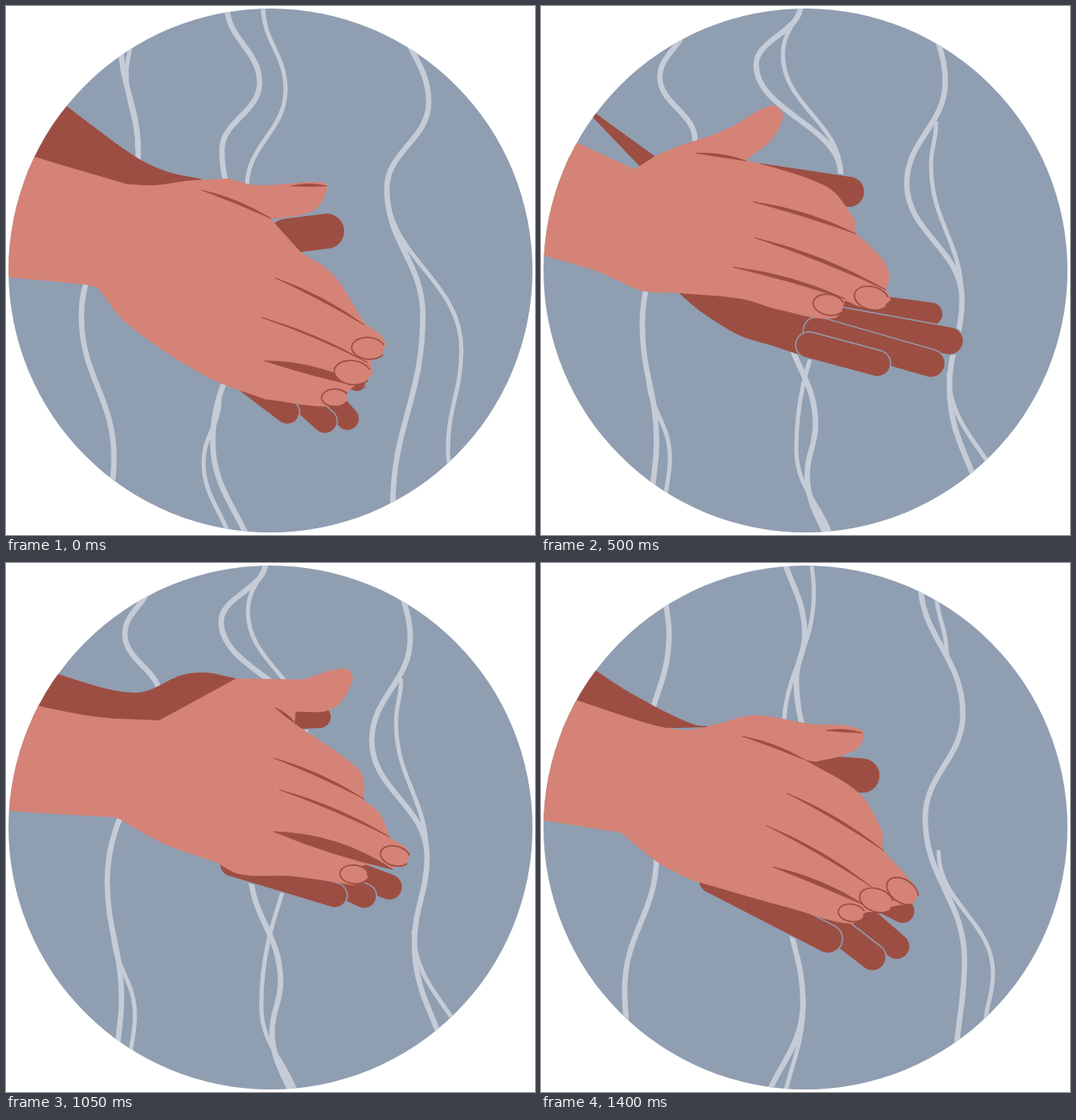
Recreate the animation shown at these times as an HTML page with a canvas. Size 632x632 px, loop 1600 ms.

```html
<!DOCTYPE html>
<html lang="en">
<head>
<meta charset="utf-8">
<title>Washing hands</title>
<style>
html, body { margin: 0; width: 100%; height: 100%; overflow: hidden; background: #fff; }
canvas { display: block; }
</style>
</head>
<body>
<canvas id="stage" width="632" height="632"></canvas>
<script>
const ctx = document.getElementById('stage').getContext('2d');
const BLUE = '#909eb1', WATER = '#c5ccd7', SKIN = '#d48376', DARK = '#9d4e43';
const rad = deg => deg * Math.PI / 180;
const points = text => text.trim().split(' ').map(s => s.split(',').map(Number));

// Smooth outline through key points; a slash marks a corner.
function outline(text) {
  const path = new Path2D();
  let last = null;
  for (const part of text.split('/')) {
    const p = points(part);
    if (last) p.unshift(last);
    else path.moveTo(...p[0]);
    const heading = i => {
      const [x0, y0] = p[Math.max(i - 1, 0)], [x1, y1] = p[Math.min(i + 1, p.length - 1)];
      return Math.atan2(y1 - y0, x1 - x0);
    };
    for (let i = 1; i < p.length; i++) {
      const [x0, y0] = p[i - 1], [x1, y1] = p[i];
      const reach = Math.hypot(x1 - x0, y1 - y0) / 3, a = heading(i - 1), b = heading(i);
      path.bezierCurveTo(x0 + reach * Math.cos(a), y0 + reach * Math.sin(a),
        x1 - reach * Math.cos(b), y1 - reach * Math.sin(b), x1, y1);
    }
    last = p[p.length - 1];
  }
  return path;
}

// Water swings from one turning point to the next, upright at each.
function stream(text) {
  const path = new Path2D(), p = points(text);
  path.moveTo(...p[0]);
  for (let i = 1; i < p.length; i++) {
    const [x0, y0] = p[i - 1], [x1, y1] = p[i], k = (y1 - y0) * 0.43;
    path.bezierCurveTo(x0, y0 + k, x1, y1 - k, x1, y1);
  }
  return path;
}

// Turning points of the wide and the narrow streams.
const water = [
  {
    wide: ['137,40 158,175 90,370 129,540 125,600', '264,0 303,92 258,172 295,330 247,520 300,690',
      '470,0 505,115 455,218 498,370 462,600'],
    thin: ['149,40 144,80 157,170', '307,0 334,100 288,215', '255,470 236,545 270,660',
      '455,218 544,410 528,530 530,560']
  }, {
    wide: ['148,30 153,85 123,235 138,350 100,510 102,560',
      '285,-40 315,85 305,140 325,270 295,400 313,525 262,680',
      '453,20 504,180 459,305 506,475 495,610'],
    thin: ['323,-10 326,35 290,200 317,320', '314,520 285,690', '472,30 485,112',
      '475,345 540,490 530,560']
  }, {
    wide: ['172,20 142,85 184,160 121,380 138,520 132,600', '310,0 257,70 358,200',
      '292,365 328,500 318,560 352,680', '470,10 483,90 437,212 503,350 488,455 530,630'],
    thin: ['128,440 154,540 148,600', '315,-20 289,58 358,200 358,250 305,530 350,660',
      '472,140 466,190 503,350', '487,440 560,620']
  }
];

// far: arm or palm behind, fingers: from, to, width,
// front: near hand, folds: from, to, thickness, nails: x, y, length, degrees.
const hands = {
  clasp: {
    far: '40,95 / 73,120 150,177 190,197 235,207 / 145,230 0,200',
    fingers: [[335, 275, 383, 269, 42], [385, 442, 420, 451, 18], [370, 450, 408, 493, 27],
      [335, 455, 381, 496, 28], [290, 450, 336, 485, 28]],
    front: '0,168 / 34,180 145,213 / 180,214 215,209 265,206 / 300,214 378,210 384,217 368,244 317,255 / 352,294 / 390,320 428,378 / 453,403 436,425 / 437,440 424,449 / 409,460 395,478 310,470 / 240,443 145,380 110,337 / 95,333 0,324',
    folds: [[322, 325, 428, 381, 3], [305, 372, 432, 426, 2], [309, 424, 430, 456, 10],
      [234, 220, 317, 254, 3], [341, 215, 383, 215, 3]],
    nails: [[433, 409, 20, 5], [414, 438, 22, 8], [393, 468, 16, 0]]
  },
  slide: {
    far: '40,110 / 65,128 110,157 180,192 210,196 / 20,200',
    fingers: [[330, 250, 384, 254, 41], [400, 400, 432, 416, 28], [370, 410, 425, 458, 30],
      [330, 420, 396, 471, 31], [205, 378, 343, 449, 33]],
    front: '0,150 / 43,164 140,195 180,199 215,191 255,182 320,192 / 383,200 377,222 330,237 315,235 / 380,275 407,320 408,342 / 450,395 436,408 / 421,410 400,417 / 387,418 370,431 300,413 180,379 / 140,358 95,322 / 0,307',
    folds: [[294, 275, 410, 344, 3], [270, 314, 395, 387, 3], [277, 363, 387, 409, 5],
      [241, 207, 315, 235, 3], [341, 200, 384, 203, 3]],
    nails: [[432, 392, 21, 35], [401, 403, 21, 20], [371, 418, 16, 8]]
  },
  open: {
    far: '40,110 / 65,128 138,181 / 115,210 10,170 / 165,343 232,391 280,407 330,424 / 400,400 350,340 250,330',
    fingers: [[262, 206, 368, 222, 36], [370, 355, 466, 368, 27], [350, 375, 488, 400, 32],
      [330, 388, 466, 427, 32], [320, 405, 402, 427, 30]],
    front: '0,140 / 43,163 112,195 / 145,175 220,148 275,119 289,130 275,160 245,184 / 295,198 338,214 354,226 375,255 / 375,270 / 410,305 416,325 412,340 / 417,352 390,361 364,352 / 350,373 285,363 240,350 165,343 / 120,340 70,318 0,297',
    folds: [[186, 176, 245, 185, 3], [254, 234, 376, 272, 4], [256, 277, 412, 339, 4],
      [230, 312, 364, 350, 4]],
    nails: [[395, 349, 21, 15], [344, 357, 19, 10]]
  },
  over: {
    far: '60,268 180,255 / 205,278 235,294 265,299 350,299 / 350,200 180,220',
    fingers: [[340, 115, 388, 127, 15], [420, 205, 476, 223, 32], [400, 240, 487, 251, 34],
      [380, 265, 474, 276, 31], [348, 284, 423, 291, 30]],
    front: '-20,163 / 55,149 183,112 / 230,77 260,70 295,67 / 385,102 392,112 383,122 / 386,130 / 462,172 455,190 / 481,208 475,228 / 470,252 430,258 / 415,275 360,274 275,266 230,256 180,230 / 60,267 -20,293',
    folds: [[331, 162, 455, 191, 3], [336, 204, 440, 227, 3], [334, 240, 430, 258, 3],
      [255, 93, 392, 127, 4], [385, 102, 352, 94, 3]],
    nails: [[446, 175, 18, 28], [462, 212, 20, 5], [455, 245, 20, 5], [409, 265, 17, 5]]
  },
  grip: {
    far: '35,120 / 63,133 155,155 210,134 240,131 275,138 / 185,200 0,185',
    fingers: [[355, 185, 375, 184, 26], [400, 365, 458, 387, 30], [380, 375, 428, 398, 28],
      [270, 360, 393, 397, 28]],
    front: '0,160 / 40,171 110,184 183,188 / 275,138 / 355,139 / 405,126 414,140 390,174 346,178 / 345,192 / 420,245 428,265 426,282 / 447,300 458,327 / 482,348 462,365 / 425,362 432,376 415,385 / 340,374 280,372 250,357 / 190,336 132,304 / 0,296',
    folds: [[320, 233, 428, 282, 3], [327, 271, 458, 327, 3], [320, 321, 462, 366, 14],
      [322, 173, 346, 192, 3]],
    nails: [[465, 350, 18, 15], [416, 372, 17, 5]]
  }
};

// start time, water, pose, tilt in degrees
const steps = [
  [0, 0, 'clasp'], [200, 1, 'slide'], [500, 2, 'open'], [650, 0, 'over', 9],
  [850, 1, 'over'], [1050, 2, 'grip'], [1200, 0, 'clasp'], [1400, 1, 'slide']
];

function fill(path, color) {
  ctx.fillStyle = color;
  ctx.fill(path);
}

function stroke(path, color, width) {
  ctx.strokeStyle = color;
  ctx.lineWidth = width;
  ctx.stroke(path);
}

// A rounded bar with a thin gap around it.
function drawFinger([x0, y0, x1, y1, width]) {
  const bone = new Path2D();
  bone.moveTo(x0, y0);
  bone.lineTo(x1, y1);
  stroke(bone, BLUE, width + 3);
  stroke(bone, DARK, width);
}

// A slightly bowed crease, thickest in the middle.
function drawFold([x0, y0, x1, y1, thick]) {
  const len = Math.hypot(x1 - x0, y1 - y0), nx = (y1 - y0) / len, ny = (x0 - x1) / len;
  const mid = off => [(x0 + x1) / 2 + nx * off, (y0 + y1) / 2 + ny * off];
  const bow = len * 0.05, leaf = new Path2D();
  leaf.moveTo(x0, y0);
  leaf.quadraticCurveTo(...mid(bow + thick), x1, y1);
  leaf.quadraticCurveTo(...mid(bow - thick), x0, y0);
  fill(leaf, DARK);
  stroke(leaf, DARK, 0.8);
}

// An oval left open at the fingertip.
function drawNail([x, y, size, deg]) {
  const nail = new Path2D();
  nail.ellipse(x, y, size, size * 0.65, rad(deg), 0.5, 2 * Math.PI - 0.5);
  fill(nail, SKIN);
  stroke(nail, DARK, 1.7);
}

for (const set of water) for (const key in set) set[key] = set[key].map(stream);
for (const hand of Object.values(hands)) {
  hand.far = outline(hand.far);
  hand.front = outline(hand.front);
}

function draw() {
  const t = performance.now() % 1600;
  const [, set, pose, tilt = 0] = steps.filter(s => s[0] <= t).pop();
  const hand = hands[pose], disc = new Path2D();
  disc.arc(316, 316, 313, 0, 7);
  ctx.clearRect(0, 0, 632, 632);
  ctx.save();
  fill(disc, BLUE);
  ctx.clip(disc);
  ctx.lineCap = ctx.lineJoin = 'round';
  water[set].wide.forEach(p => stroke(p, WATER, 6.5));
  water[set].thin.forEach(p => stroke(p, WATER, 5));
  ctx.translate(0, 220);
  ctx.rotate(rad(tilt));
  ctx.translate(0, -220);
  fill(hand.far, DARK);
  hand.fingers.forEach(drawFinger);
  fill(hand.front, SKIN);
  hand.folds.forEach(drawFold);
  hand.nails.forEach(drawNail);
  ctx.restore();
  requestAnimationFrame(draw);
}
draw();
</script>
</body>
</html>
```
